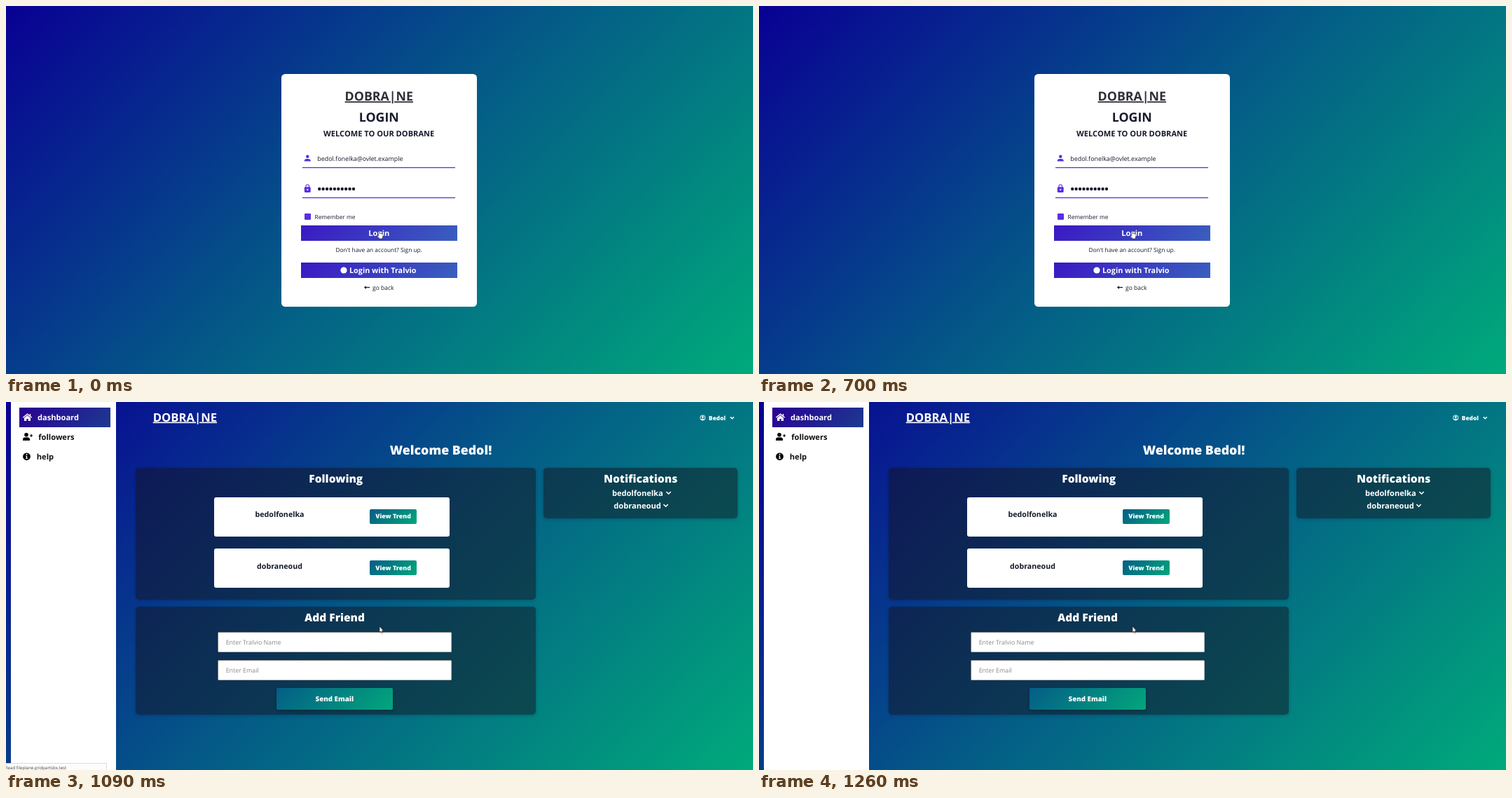
Write an HTML page that moves like this. It is 1066 px wide and 525 px high and loops after 2100 ms.

```html
<!DOCTYPE html>
<html lang="en">
<head>
<meta charset="utf-8">
<title>Login to dashboard</title>
<style>
  html, body { margin: 0; width: 100%; height: 100%; overflow: hidden; }
  body { position: relative; background: linear-gradient(135deg, #090094, #045b87 50%, #00aa7b); }
  .scene, svg { position: absolute; left: 0; top: 0; width: 1066px; height: 525px; overflow: hidden; }
  .scene div { position: absolute; box-sizing: border-box; background: #fff; }
  .scene .purple { left: 420.5px; width: 223.5px; height: 22px; background: linear-gradient(135deg, #3b18c4, #3960be); }
  .scene .panel { background: rgba(20, 18, 33, .5); border-radius: 5px; box-shadow: 0 1px 4px rgba(0, 0, 40, .25); }
  .scene .teal { background: linear-gradient(135deg, #045d87, #02a77b); border-radius: 2px; }
  .scene .row { left: 297px; width: 336px; height: 56px; border-radius: 3px; }
  .scene .trend { left: 519px; width: 67px; height: 21.5px; }
  .scene .field { left: 302px; width: 334px; height: 29px; border: 1px solid #a5a5a5; border-color: #777 #bbb #bbb #777; border-radius: 2px; }
  .scene .active { left: 18.5px; top: 8px; width: 130.5px; height: 28px; background: linear-gradient(135deg, #2a0094, #1c3b8f); }

  text { font-family: "Open Sans", "Noto Sans", sans-serif; text-rendering: geometricPrecision; fill: #161a2c; }
  .mid { text-anchor: middle; }
  .bold { font-weight: 700; }
  .heavy { font-weight: 800; }
  .white, .white text { fill: #fff; }
  .brand { font-weight: 700; text-decoration: underline; }
  .s8 { font-size: 8.35px; }
  .s9 { font-size: 8.88px; }
  .s11 { font-size: 11.1px; }
  .s16 { font-size: 15.55px; }
  .s18 { font-size: 17.77px; }
  .hint { fill: #888; }
  #status rect { fill: #fcfcfc; stroke: #c4c8cc; stroke-width: .6; }
  #statusText { font-size: 6.15px; fill: #444; }
</style>
</head>
<body>
<div class="scene" id="login">
  <div style="left:392.5px;top:97px;width:279px;height:332px;border-radius:5.5px"></div>
  <div class="purple" style="top:313px"></div>
  <div class="purple" style="top:366px"></div>
  <svg viewBox="0 0 1066 525">
    <text class="brand mid s18" x="532.3" y="135" style="fill:#302f39">DOBRA|NE</text>
    <text class="bold mid s18" x="532.3" y="165.3">LOGIN</text>
    <text class="bold mid s11" x="532.2" y="185.5">WELCOME TO OUR DOBRANE</text>

    <g fill="#5a2fe0">
      <path transform="translate(423.6 210.3) scale(.555)" d="M12 12a4 4 0 1 0 0-8 4 4 0 0 0 0 8zm0 2c-2.7 0-8 1.3-8 4v2h16v-2c0-2.7-5.3-4-8-4z"/>
      <path transform="translate(423.6 253.7) scale(.555)" fill-rule="evenodd" d="M18 8h-1V6A5 5 0 0 0 7 6v2H6a2 2 0 0 0-2 2v10a2 2 0 0 0 2 2h12a2 2 0 0 0 2-2V10a2 2 0 0 0-2-2zM8.900 8V6a3.100 3.100 0 0 1 6.200 0v2zM12 13a2 2 0 1 1 0 4 2 2 0 0 1 0-4z"/>
      <rect x="423" y="229.900" width="218" height="1.300"/>
      <rect x="423" y="272.900" width="218" height="1.300" fill="#4f38cf"/>
      <rect x="426" y="296" width="9" height="9" rx="1"/>
    </g>
    <text class="s9" x="444.300" y="220.500">bedol.fonelka@ovlet.example</text>
    <path d="M447.200 261h49" stroke="#161a2c" stroke-width="4.400" stroke-linecap="round" stroke-dasharray="0 5.420"/>
    <text class="s8" x="440.500" y="303.900">Remember me</text>

    <g class="white">
      <text class="bold mid s11" x="532.300" y="328">Login</text>
      <circle cx="482" cy="377" r="4.600"/>
      <text class="bold" x="490" y="381" font-size="10.800">Login with Tralvio</text>
    </g>
    <text class="s8 mid" x="532.200" y="351">Don't have an account? Sign up.</text>
    <path d="M519 401.500h-6" stroke="#161a2c" stroke-width="1.300"/>
    <path d="M510.800 401.500l3.200-2.300v4.600z" fill="#161a2c"/>
    <text x="523" y="404.500" font-size="8.500">go back</text>

    <circle id="click" cx="532" cy="319.600" r="6.700" fill="#d8cc20" opacity=".7"/>
    <path d="M532 321.200q.9-.9 1.700 0v3.300l3.500.8q1 .4.900 1.500l-.7 3.300-.5 1.900h-3.700l-2.600-3.600q-.5-1.100.5-1.200l.9.700z" fill="#fff" stroke="#223" stroke-width=".5"/>
  </svg>
</div>

<div class="scene" id="dashboard">
  <div style="left:7px;top:0;width:150px;height:525px"></div>
  <div class="active"></div>
  <div class="panel" style="left:185px;top:94px;width:571px;height:188px"></div>
  <div class="panel" style="left:185px;top:292px;width:571px;height:154px"></div>
  <div class="panel" style="left:767px;top:94px;width:277px;height:71.5px"></div>
  <div class="row" style="top:135.5px"></div>
  <div class="row" style="top:208.5px"></div>
  <div class="teal trend" style="top:152.5px"></div>
  <div class="teal trend" style="top:225.5px"></div>
  <div class="field" style="top:328px"></div>
  <div class="field" style="top:368px"></div>
  <div class="teal" style="left:385.5px;top:408px;width:166.5px;height:31px;box-shadow:0 2px 5px rgba(0,0,0,.25)"></div>
  <svg viewBox="0 0 1066 525">
    <g class="white">
      <path d="M24.300 22.300l6.200-5.200 6.200 5.200" fill="none" stroke="#fff" stroke-width="1.400"/>
      <path d="M26 22.700l4.500-3.700 4.500 3.700V27h-3.300v-3h-2.400v3H26zM33.700 17h1.500v3h-1.500z"/>
      <text class="bold s11" x="45" y="26.200">dashboard</text>
    </g>
    <circle cx="29" cy="46.700" r="2.800"/>
    <path d="M24 55v-1.500q0-3 3-3h4q3 0 3 3V55zM34 47.400h1.500v-1.500h1.200v1.500h1.500v1.200h-1.500v1.500h-1.200v-1.500H34z"/>
    <text class="bold s11" x="46.300" y="54.100" style="fill:#111">followers</text>
    <circle cx="29.500" cy="77.800" r="5.400"/>
    <path d="M28.200 76.800h2v3.300h.7v1h-2.800v-1h.7v-2.300h-.6zM28.700 74h1.600v1.700h-1.600z" fill="#fff"/>
    <text class="bold s11" x="43.800" y="82" style="fill:#111">help</text>

    <g class="white">
      <text class="brand" x="209.700" y="27.500" font-size="16.660">DOBRA|NE</text>
      <circle cx="994.200" cy="22.500" r="3.600" fill="none" stroke="#fff"/>
      <circle cx="994.200" cy="21.500" r="1.500"/>
      <path d="M991.500 24.800q2.700-2.200 5.400 0-2.700 2.400-5.400 0z"/>
      <text class="heavy s8" x="1002.800" y="25.600">Bedol</text>
      <g fill="none" stroke="#fff" stroke-width="1.500">
        <path d="M1033.800 21.400l2.500 2.400 2.500-2.400"/>
        <path d="M942.300 128l3.200 3.100 3.200-3.100"/>
        <path d="M938.300 146l3.200 3.100 3.200-3.100"/>
      </g>
      <g class="heavy mid">
        <text class="s18" x="620.500" y="74.800">Welcome Bedol!</text>
        <text class="s16" x="470.800" y="115.300">Following</text>
        <text class="s16" x="469" y="313.400">Add Friend</text>
        <text class="s16" x="905.700" y="115.300">Notifications</text>
        <text class="s9" x="552.600" y="166.400">View Trend</text>
        <text class="s9" x="552.600" y="239.600">View Trend</text>
        <text x="468.800" y="427" font-size="9.770">Send Email</text>
      </g>
      <g class="bold mid s11">
        <text x="901.300" y="133.600">bedolfonelka</text>
        <text x="901" y="151.700">dobraneoud</text>
      </g>
    </g>
    <g class="bold mid" font-size="10.660">
      <text x="390.500" y="164.300">bedolfonelka</text>
      <text x="390.500" y="237.700">dobraneoud</text>
    </g>
    <text class="s9 hint" x="313.700" y="345.700">Enter Tralvio Name</text>
    <text class="s9 hint" x="313.700" y="385.800">Enter Email</text>
    <path d="M533 320v8.600l1.900-1.700 1.300 3 1.300-.6-1.300-2.900h2.500z" fill="#fff" stroke="#111" stroke-width=".6"/>
  </svg>
</div>

<svg id="status" viewBox="0 0 1066 525">
  <rect x="-2" y="515.300" width="145.500" height="12"/>
  <text id="statusText" x="-1.200" y="523.500"></text>
</svg>

<script>
  const LOOP = 2100;
  const messages = [
    [770, "Sending request to 192.0.2.7..."],
    [1000, "Waiting for 192.0.2.7..."],
    [1090, "Read fileplane.gridpartsbx.test"],
    [1260, ""]
  ];
  const el = id => document.getElementById(id);
  const show = (id, on) => { el(id).style.visibility = on ? "visible" : "hidden"; };

  function draw() {
    const t = performance.now() % LOOP;
    const message = messages.reduce((text, [start, next]) => t >= start ? next : text, "");
    const loaded = t >= 1090;
    show("login", !loaded);
    show("dashboard", loaded);
    show("click", t >= 530 && t < 700);
    show("status", message);
    el("statusText").textContent = message;
    requestAnimationFrame(draw);
  }
  draw();
</script>
</body>
</html>
```
